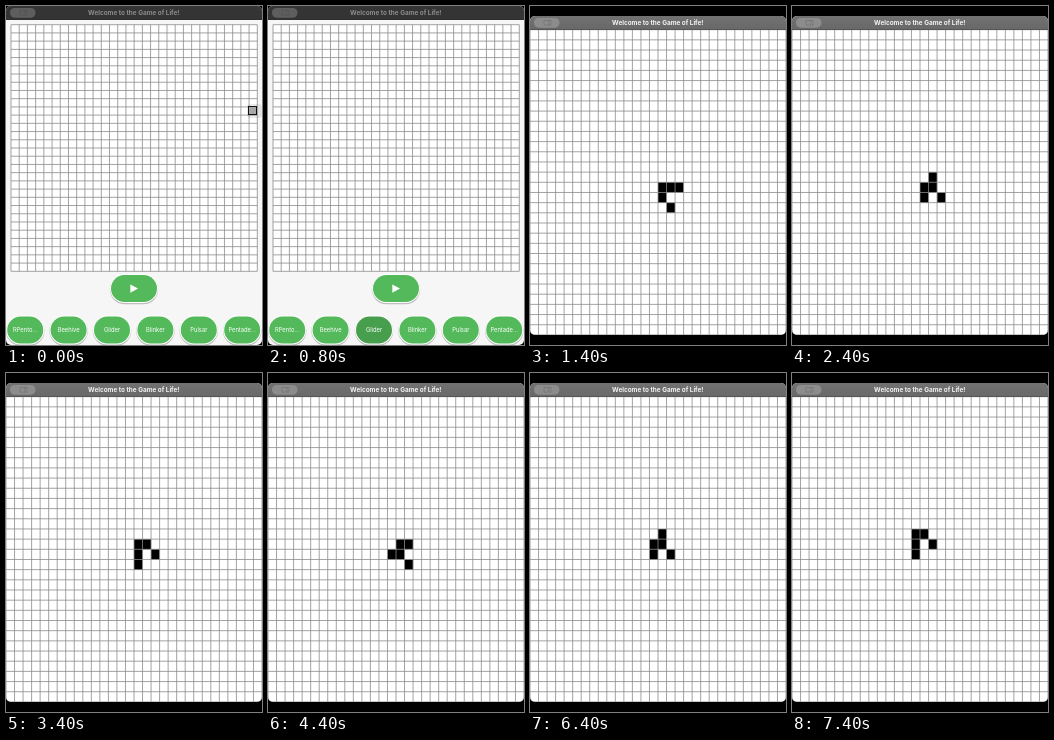
Write an HTML page that moves like this. It is 256x339 px and loops after 8000 ms.

```html
<!DOCTYPE html>
<html lang="en">
<head>
<meta charset="utf-8">
<title>Game of Life</title>
<style>
html, body { margin: 0; height: 100%; overflow: hidden; background: #000; }
svg { display: block; width: 100%; height: 100%; }
text { font-family: Inter, Roboto, sans-serif; text-anchor: middle; }
.title { font-size: 6.4px; font-weight: 700; }
.label { font-size: 5.8px; fill: #fff; }
.grid { fill: none; stroke: #8c8c8c; stroke-width: .8; }
</style>
</head>
<body>
<svg viewBox="0 0 256 339">
  <defs>
    <linearGradient id="metal" x2="0" y2="1">
      <stop stop-color="#727272"/><stop offset="1" stop-color="#686868"/>
    </linearGradient>
    <clipPath id="menuClip"><rect width="256" height="339" rx="5"/></clipPath>
    <clipPath id="boardClip"><rect y="10" width="256" height="319" rx="5"/></clipPath>
  </defs>
  <g id="menu" clip-path="url(#menuClip)">
    <rect width="256" height="339" fill="#f6f6f6"/>
    <g id="menuBar"></g>
    <rect x="5" y="18.5" width="246.5" height="247" fill="#fff"/>
    <path id="menuGrid" class="grid"/>
    <g id="hover">
      <rect x="241" y="98" width="15" height="14" rx="3" fill="#000" opacity=".08"/>
      <rect x="242.5" y="100.5" width="8" height="8" fill="#a8a8a8" stroke="#111"/>
    </g>
    <g id="buttons"></g>
    <path d="M124.3 278.5V286.7L132 282.6Z" fill="#fff"/>
  </g>
  <g id="board" clip-path="url(#boardClip)">
    <rect y="10" width="256" height="319" fill="#fff"/>
    <path id="cells"/>
    <path id="boardGrid" class="grid"/>
    <g id="boardBar"></g>
  </g>
</svg>
<script>
const $ = id => document.getElementById(id);
const LOOP = 8000, PRESS = 100, LEAVE = 800, FOCUS = 1300, OPEN = 1400, STEP = 1000;
const N = 30, GREEN = '#53b95b', PRESSED = '#479f4e';
const board = { x: 0, y: 23.7, w: 256 / N, h: 305.2 / N };

function gridPath({ x, y, w, h }) {
  let d = '';
  for (let i = 0; i <= N; i++)
    d += `M${x + i * w} ${y}v${N * h}M${x} ${y + i * h}h${N * w}`;
  return d;
}

function bar(y, fill, pill, ink) {
  return `<rect y="${y}" width="256" height="14" fill="${fill}"/>
    <rect y="${y + 13.4}" width="256" height=".6" fill="#222" opacity=".4"/>
    <rect x="4" y="${y + 2}" width="25.5" height="9.7" rx="4.6" fill="${pill}"/>
    <path d="M14 ${y + 4.5}h7v4.6h-7zm4.8 0v4.6" fill="none" stroke="#333" stroke-width=".5" opacity=".4"/>
    <text class="title" x="127.8" y="${y + 8.5}" fill="${ink}">Welcome to the Game of Life!</text>`;
}

function button(x, y, w, name = '') {
  const rect = (dy, grow, fill) =>
    `<rect x="${x - w / 2 - grow}" y="${y - 13.5 - grow + dy}" width="${w + 2 * grow}"
      height="${27 + 2 * grow}" rx="${13.5 + grow}" fill="${fill}"`;
  return rect(1, 1.2, '#bdbdbd') + '/>' + rect(0, 1, '#fff') + '/>' +
    rect(0, 0, GREEN) + ` id="b${name}"/>` +
    `<text class="label" x="${x}" y="${y + 2.3}">${name}</text>`;
}

// One generation; cells are "column,row" strings.
function evolve(live) {
  const count = {};
  for (const cell of live) {
    const [c, r] = cell.split(',').map(Number);
    for (let dx = -1; dx <= 1; dx++)
      for (let dy = -1; dy <= 1; dy++)
        if (dx || dy) {
          const key = `${c + dx},${r + dy}`;
          count[key] = (count[key] || 0) + 1;
        }
  }
  return Object.keys(count).filter(k => count[k] === 3 || count[k] === 2 && live.includes(k));
}

function cellPath(live) {
  const { x, y, w, h } = board;
  return live.map(cell => {
    const [c, r] = cell.split(',').map(Number);
    return `M${x + c * w} ${y + r * h}h${w}v${h}h${-w}z`;
  }).join('');
}

const generations = [['15,15', '16,15', '17,15', '15,16', '16,17']];
while (generations.length < 7) generations.push(evolve(generations.at(-1)));
const paths = generations.map(cellPath);

$('menuGrid').setAttribute('d', gridPath({ x: 5, y: 18.7, w: 8.21, h: 8.22 }));
$('boardGrid').setAttribute('d', gridPath(board));
$('boardBar').innerHTML = bar(10, 'url(#metal)', '#8c8c8c', '#f4f4f4');
$('buttons').innerHTML = button(128, 282.5, 46) +
  ['RPento...', 'Beehive', 'Glider', 'Blinker', 'Pulsar', 'Pentade...']
    .map((name, i) => button(19.2 + i * 43.4, 324, 36, name)).join('');
const bars = [bar(0, '#343434', '#5e5e5e', '#8c8c8c'), bar(0, 'url(#metal)', '#8c8c8c', '#f4f4f4')];
let shownBar = -1;

function draw() {
  const t = performance.now() % LOOP;
  const open = t >= OPEN, focus = +(t >= FOCUS);
  $('menu').style.display = open ? 'none' : '';
  $('board').style.display = open ? '' : 'none';
  $('hover').style.display = t < LEAVE ? '' : 'none';
  $('bGlider').setAttribute('fill', t < PRESS ? GREEN : PRESSED);
  if (focus !== shownBar) $('menuBar').innerHTML = bars[shownBar = focus];
  if (open) $('cells').setAttribute('d', paths[Math.floor((t - OPEN) / STEP)]);
  requestAnimationFrame(draw);
}
draw();
</script>
</body>
</html>
```
